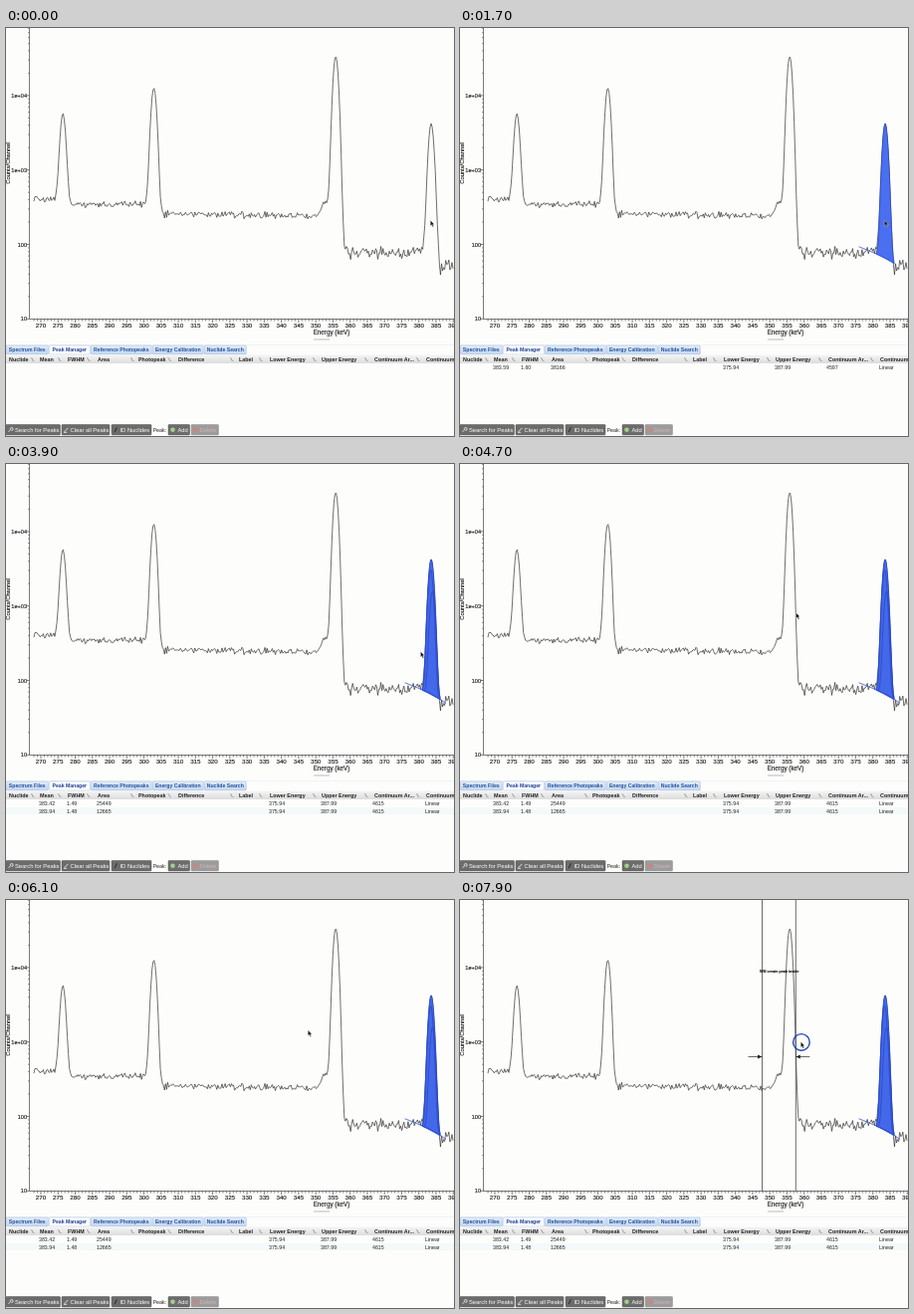
These frames come from a looping animation (450x410 px, 8000 ms). An HTML page:

```html
<!DOCTYPE html>
<html lang="en">
<head>
<meta charset="utf-8">
<title>Peak fitting</title>
<style>
  html, body { margin: 0; width: 100%; height: 100%; overflow: hidden; background: #fdfefc; }
  svg { display: block; width: 450px; height: 410px; font-family: "Liberation Sans", Arial, sans-serif; }
  text { white-space: pre; }
</style>
</head>
<body>
<svg id="stage" viewBox="0 0 450 410">
  <defs>
    <linearGradient id="head" x2="0" y2="1">
      <stop offset="0" stop-color="#f5f5f5"/><stop offset="1" stop-color="#dcdcdc"/>
    </linearGradient>
    <linearGradient id="tab" x2="0" y2="1">
      <stop offset="0" stop-color="#e3edfa"/><stop offset="1" stop-color="#c3d7f0"/>
    </linearGradient>
  </defs>
</svg>
<script>
const LOOP = 8000, STEP = 100;
const stage = document.getElementById("stage");

function add(parent, tag, attrs = {}, content) {
  const node = document.createElementNS("http://www.w3.org/2000/svg", tag);
  for (const key in attrs) node.setAttribute(key, attrs[key]);
  if (content !== undefined) node.textContent = content;
  parent.append(node);
  return node;
}
const group = (parent = stage, attrs) => add(parent, "g", attrs);
const label = (parent, x, y, content, size, attrs = {}) =>
  add(parent, "text", { x, y, "font-size": size, fill: "#222", ...attrs }, content);
const rect = (parent, x, y, width, height, fill, attrs = {}) =>
  add(parent, "rect", { x, y, width, height, fill, ...attrs });
const show = (node, on) => node.setAttribute("display", on ? "inline" : "none");

// Scales: linear energy, logarithmic counts
const PX_PER_KEV = 3.452;
const xOf = keV => 35 + (keV - 270) * PX_PER_KEV;
const yOf = counts => 292.3 - 74.8 * (Math.log10(counts) - 1);
const bell = (x, center, sigma) => Math.exp(-((x - center) ** 2) / (2 * sigma * sigma));
const pathOf = points => "M" + points.map(([x, y]) => x.toFixed(2) + " " + y.toFixed(2)).join("L");

let seed = 41;
function random() {
  seed = (seed * 16807) % 2147483647;
  return seed / 2147483647;
}

const peaks = [[57.2, 5250, 2.3], [148.5, 12300, 2.3], [331.2, 33500, 2.2], [427.1, 4120, 2.35]];

function baseline(x) {
  if (x < 57) return 405;
  if (x < 148) return 348;
  if (x < 331) return 258 - 14 * (x - 148) / 183 + 125 * bell(x, 321.5, 4);
  if (x < 427) return 79;
  return 52;
}

function spectrum() {
  const points = [];
  for (let x = 28; x <= 450; x += 1.05) {
    const base = baseline(x);
    const total = peaks.reduce((sum, [c, h, s]) => sum + h * bell(x, c, s), base);
    const spread = 2.1 * (random() + random() - 1) / Math.sqrt(total);
    points.push([x, yOf(total * (1 + spread))]);
  }
  return points;
}

add(stage, "path", {
  d: pathOf(spectrum()), fill: "none", stroke: "#303030", "stroke-width": 0.7, "stroke-linejoin": "round"
});

// Fitted peaks above a straight continuum
const FIT_FROM = xOf(375.94), FIT_TO = xOf(387.99);
const continuum = x => 93 - 44 * (x - FIT_FROM) / (FIT_TO - FIT_FROM);

function curve(counts, from, to) {
  const points = [];
  for (let x = from; x <= to; x += 0.4) points.push([x, yOf(counts(x))]);
  return points;
}

function drawFit(parent, parts, fill) {
  const from = 418, to = 436;
  const height = x => parts.reduce((sum, [c, h, s]) => sum + h * bell(x, c, s), continuum(x));
  const outline = curve(height, from, to).concat(curve(continuum, from, to).reverse());
  add(parent, "path", {
    d: pathOf(outline) + "Z", fill, stroke: "#2848c8", "stroke-width": 0.8
  });
}

function drawContinuum(parent, to) {
  add(parent, "path", {
    d: pathOf(curve(continuum, FIT_FROM, to)), fill: "none", stroke: "#3558d8", "stroke-width": 1
  });
}

const singleFit = group(), doubleFit = group();
drawFit(singleFit, [[xOf(383.59), 4120, 2.35]], "#4a6ff0");
drawContinuum(singleFit, 437);
const major = [xOf(383.42), 2980, 2.25], minor = [xOf(383.94), 1500, 2.2];
drawFit(doubleFit, [major, minor], "#4468ea");
drawFit(doubleFit, [major], "none");
drawFit(doubleFit, [minor], "none");
drawContinuum(doubleFit, FIT_TO);

// Axes
const AXIS_X = 23.5, AXIS_Y = 292.5;
const INK = { stroke: "#222", "stroke-width": 0.15 };

function drawAxes() {
  let lines = `M${AXIS_X} 0V${AXIS_Y}H450`;
  for (let keV = 268; keV <= 390; keV++) {
    lines += `M${xOf(keV).toFixed(2)} ${AXIS_Y}v${keV % 5 ? 2 : 3.5}`;
    if (keV % 5 === 0)
      label(stage, xOf(keV), 301.3, keV, 6.2, { "text-anchor": "middle", ...INK });
  }
  [[10, "10"], [100, "100"], [1000, "1e+03"], [10000, "1e+04"]].forEach(([counts, name]) => {
    for (let i = 1; i < 10; i++)
      lines += `M${AXIS_X} ${yOf(counts * i).toFixed(2)}h${i === 1 ? -3 : -1.3}`;
    label(stage, 21, yOf(counts) + 2, name, 5.6, { "text-anchor": "end", ...INK });
  });
  add(stage, "path", { d: lines, fill: "none", stroke: "#444", "stroke-width": 0.7 });
  label(stage, 327, 307.6, "Energy (keV)", 6.3, { "text-anchor": "middle", ...INK });
  label(stage, 0, 0, "Counts/Channel", 5.8, {
    "text-anchor": "middle", transform: "translate(3.5 136) rotate(-90)", ...INK
  });
  rect(stage, 309, 312.5, 16, 1, "#bbb");
}
drawAxes();

// Tabs
rect(stage, 0, 318.5, 450, 0.6, "#e4e9f0");
[[0, 42, "Spectrum Files"], [43, 41, "Peak Manager"], [85, 61, "Reference Photopeaks"],
 [147, 51, "Energy Calibration"], [199, 42, "Nuclide Search"]].forEach(([x, width, name], i) => {
  const active = i === 1;
  rect(stage, x + 0.3, 319, width, 9, active ? "#fff" : "url(#tab)", {
    stroke: "#9db8dc", "stroke-width": 0.5, rx: 1
  });
  label(stage, x + width / 2 + 0.3, 325.4, name, 5.15, {
    "text-anchor": "middle", "font-weight": "bold", fill: active ? "#1c3f94" : "#24509c"
  });
});

// Table
rect(stage, 0, 328.5, 450, 8.5, "url(#head)");
[[3, "Nuclide", 27], [34, "Mean", 54], [62, "FWHM", 83], [92, "Area", 127], [133, "Photopeak", 164.5],
 [173, "Difference", 227], [234, "Label", 256], [265, "Lower Energy", 310], [317, "Upper Energy", 362],
 [370, "Continuum Ar...", 414], [422, "Continuum"]].forEach(([x, name, mark]) => {
  label(stage, x, 334.6, name, 5.4, { "font-weight": "bold" });
  if (mark) add(stage, "path", {
    d: `M${mark - 2} 331.5l2 1.2M${mark - 1} 333.6l2.4 1`, stroke: "#888", "stroke-width": 0.8
  });
});

const columns = [33, 61, 91, 264, 316, 368, 421];
function tableRow(parent, y, cells) {
  cells.forEach((cell, i) => label(parent, columns[i], y, cell, 5.25));
}
const singleRow = group(), doubleRows = group();
tableRow(singleRow, 343, ["383.59", "1.60", "38166", "375.94", "387.99", "4597", "Linear"]);
rect(doubleRows, 0, 345.3, 450, 7, "#f4f9f9");
tableRow(doubleRows, 343, ["383.42", "1.49", "25449", "375.94", "387.99", "4615", "Linear"]);
tableRow(doubleRows, 350.8, ["383.94", "1.48", "12665", "375.94", "387.99", "4615", "Linear"]);

// Toolbar
function button(x, width, name, textX, icon, enabled = true) {
  rect(stage, x, 398.5, width, 10.5, enabled ? "#6c6c6c" : "#9c9c9c", {
    rx: 0.8, stroke: enabled ? "#555" : "#909090", "stroke-width": 0.5
  });
  icon(x + 4.5, 403.8);
  label(stage, textX, 406, name, 5.8, { fill: enabled ? "#fff" : "#cfb4b4" });
}
const strokeIcon = (d, color) => (x, y) =>
  add(stage, "path", { d, transform: `translate(${x} ${y})`, fill: "none", stroke: color, "stroke-width": 0.9 });
const dotIcon = color => (cx, cy) => add(stage, "circle", { cx, cy, r: 2.3, fill: color });
button(0, 54.5, "Search for Peaks", 9, strokeIcon("M-2 2l2-2a1.4 1.4 0 1 1 1 .6", "#eee"));
button(56, 48, "Clear all Peaks", 64.5, strokeIcon("M-2 2L2-2M-2.5 2.5h3", "#eee"));
button(106, 40, "ID Nuclides", 114.5, strokeIcon("M-1.5 2.5L1-2.5", "#222"));
label(stage, 147.5, 406, "Peak:", 5.4);
button(163, 21.5, "Add", 172.5, dotIcon("#a3cf8c"));
button(186, 27.5, "Delete", 194.5, dotIcon("#cc8480"), false);

// Selection band
const band = group(stage, { fill: "none", stroke: "#444", "stroke-width": 0.8 });
const BAND_LEFT = 303.5;
const bandLines = add(band, "path");
const bandHeads = add(band, "path", { fill: "#222", stroke: "none" });
const bandText = label(band, 0, 73, "Will create peak inside", 3.95, {
  "text-anchor": "middle", fill: "#111", stroke: "#111", "stroke-width": 0.2
});

function drawBand(right) {
  bandLines.setAttribute("d",
    `M${BAND_LEFT} 0V${AXIS_Y}M${right} 0V${AXIS_Y}M${BAND_LEFT - 14} 157.5h14M${right} 157.5h14`);
  bandHeads.setAttribute("d",
    `M${BAND_LEFT} 157.5l-4.5-2v4zM${right} 157.5l4.5-2v4z`);
  bandText.setAttribute("x", (BAND_LEFT + right) / 2 + 0.3);
}

// Pointer
const pointer = group();
const ring = add(pointer, "circle", { cx: 0.6, cy: 0.4, r: 8.3, fill: "none" });
add(pointer, "path", {
  d: "M0 0V5.6L1.3 4.5L2.3 6.7L3.3 6.2L2.3 4.1H4z", fill: "#111", stroke: "#fff", "stroke-width": 0.35
});

const route = [[0, 426.3, 193.3], [3800, 426.3, 193.3], [4700, 337.5, 149.5], [5600, 303.3, 130.8],
               [6850, 303.3, 130.8], [7200, 312.2, 132.5], [7900, 342.3, 142.5]];

function pointerAt(time) {
  const next = route.findIndex(stop => stop[0] > time);
  if (next < 0) return route[route.length - 1].slice(1);
  const [t0, x0, y0] = route[next - 1], [t1, x1, y1] = route[next];
  const part = (time - t0) / (t1 - t0);
  return [x0 + (x1 - x0) * part, y0 + (y1 - y0) * part];
}

const within = (time, from, to) => time >= from && time < to;

function render(time) {
  const [x, y] = pointerAt(time);
  pointer.setAttribute("transform", `translate(${x} ${y})`);

  const dragging = time >= 6700;
  show(ring, dragging || within(time, 700, 1200) || within(time, 2800, 3300));
  ring.setAttribute("stroke", dragging ? "#2346b4" : "#33353c");
  ring.setAttribute("stroke-width", dragging ? 1.4 : 1.1);

  const fitted = within(time, 1200, 3400), refitted = time >= 3400;
  [singleFit, singleRow].forEach(node => show(node, fitted));
  [doubleFit, doubleRows].forEach(node => show(node, refitted));

  show(band, time >= 6900);
  drawBand(Math.max(BAND_LEFT + 0.5, x - 5));
}

const start = performance.now();
function tick() {
  const elapsed = Math.max(0, performance.now() - start) % LOOP;
  render(Math.floor(elapsed / STEP) * STEP);
  requestAnimationFrame(tick);
}
tick();
</script>
</body>
</html>
```
